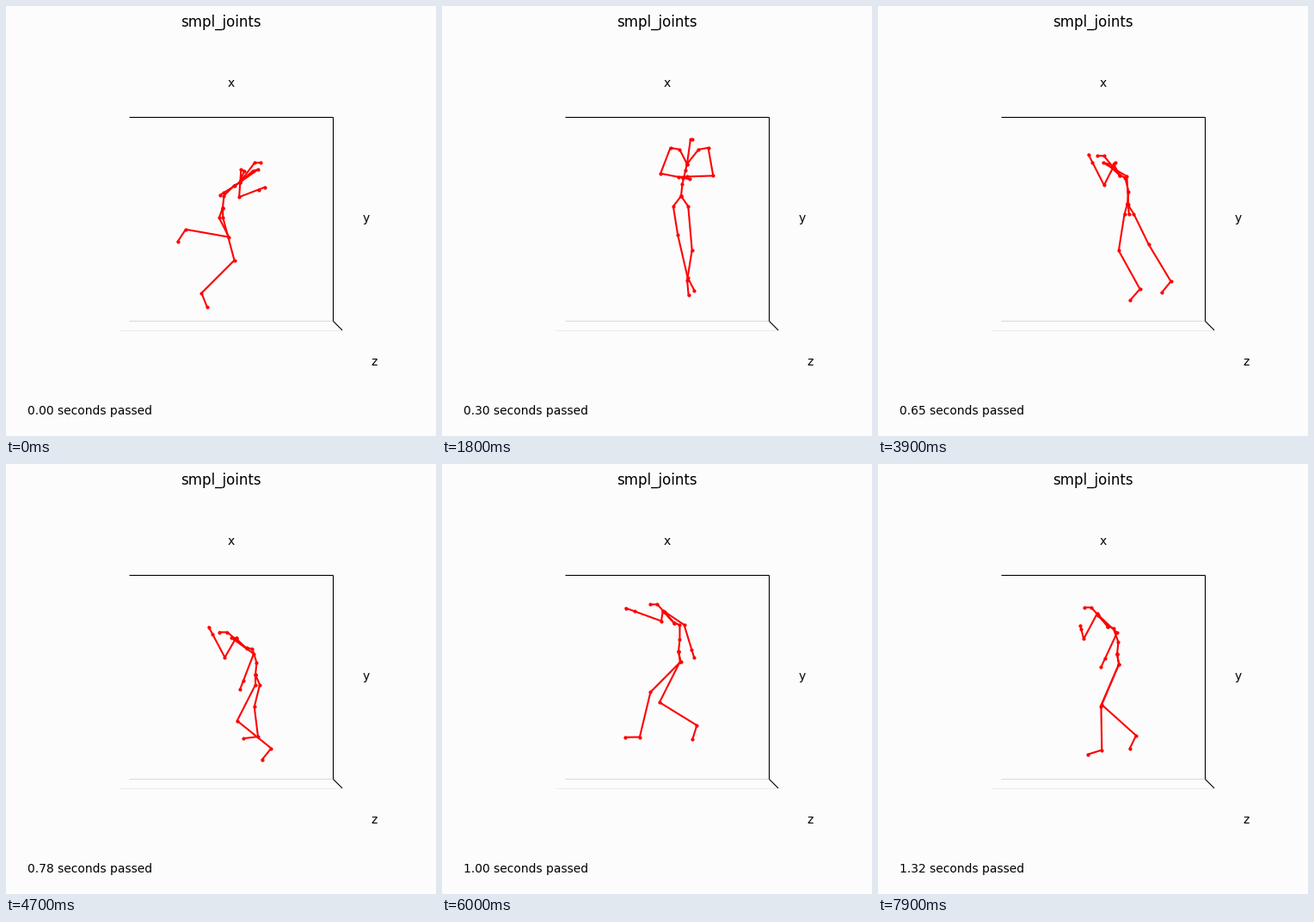
A matplotlib script for the animation above (8 s loop, 500 px wide and 500 px high).

```python
import numpy as np
import matplotlib.pyplot as plt
from matplotlib.animation import FuncAnimation

FRAMES, FPS = 80, 60
BG = "#fcfcfc"
T = np.arange(FRAMES)

# Key poses of the turn and run: pelvis in pixels, everything else in degrees.
# Limb angles start at straight down and grow to the right; torso ones at up.
KEYS = np.array([0, 18, 26, 39, 47, 60, 79])
POSE = {
    "x": (252, 278, 287, 290, 290, 275, 278),
    "y": (235, 223, 240, 230, 245, 218, 221),
    "bend": (45, 13, 0, -14, -17, 0, -20),
    "lean": (37, 8, -4, -39, -50, -42, -41),
    "upper_a": (-4, -21, 12, 60, 54, -9, 47),
    "fore_a": (111, 79, 25, 3, -21, -110, -25),
    "upper_b": (-55, 10, -25, -27, -30, 56, -28),
    "fore_b": (-58, -88, -124, -153, -152, 17, -166),
    "thigh_a": (27, 9, 20, -9, -27, -29, -23),
    "shin_a": (-100, 13, 16, 29, 51, 58, 1),
    "thigh_b": (15, 5, 5, 26, -14, -46, -26),
    "shin_b": (-45, -9, -15, 31, 7, -14, 47),
}


def spline(vals):
    """Sample a smooth curve through the key values at every frame."""
    v = np.array(vals, float)
    slope = np.gradient(v, KEYS)
    i = np.clip(np.searchsorted(KEYS, T, side="right") - 1, 0, len(KEYS) - 2)
    h = KEYS[i + 1] - KEYS[i]
    u = (T - KEYS[i]) / h
    return ((1 + 2 * u) * (1 - u) ** 2 * v[i] + u * (1 - u) ** 2 * h * slope[i]
            + u * u * (3 - 2 * u) * v[i + 1] - u * u * (1 - u) * h * slope[i + 1])


def bump(center, width):
    return np.exp(-((T - center) / width) ** 2)


def vec(x, y):
    return np.stack(np.broadcast_arrays(x, y, T)[:2], axis=-1)


def down(deg, length):
    a = np.radians(deg)
    return vec(length * np.sin(a), length * np.cos(a))


def up(deg, length):
    return down(180 - deg, length)


p = {name: spline(vals) for name, vals in POSE.items()}

# The leap at the start and the push-off of each leg.
p["y"] -= 26 * bump(10, 5)
push_a, push_b = bump(56.5, 2), bump(70, 5)
p["thigh_a"] += 47 * push_a
p["shin_a"] += 8 * push_a
p["thigh_b"] += 66 * push_b
p["shin_b"] += 28 * push_b

# Visible bone lengths: limbs shorten while they point along the view.
length = {
    "upper_a": 32 - 20 * bump(60, 6),
    "fore_a": 24 + 9 * np.clip(T / 39, 0, 1) ** 2,
    "upper_b": 33 - 7 * bump(50, 13),
    "fore_b": 30 - 15 * bump(0, 8) - 18 * bump(79, 3),
    "thigh_a": 25 + 28 * np.clip(T / 60, 0, 1),
    "shin_a": 51,
    "thigh_b": 51 - 25 * bump(46, 8),
    "shin_b": 54 - 22 * bump(22, 9) - 19 * bump(47, 6),
}


def bone(name):
    return down(p[name], length[name])


def chain(*steps):
    """Add up bone vectors; gives frames x joints x 2."""
    return np.cumsum(np.stack(steps, axis=1), axis=1)


lean = p["lean"]
pelvis = vec(p["x"], p["y"])
spine = chain(pelvis, up(6, 14), up(p["bend"], 17), up(1.7 * lean, 7),
              up(lean, 29), vec(12 * np.sin(np.radians(lean)), 0))
chest = spine[:, 3]


def leg(side, sign):
    hip = down(-0.25 * lean, 12) + vec(sign * 9.5 * bump(24, 20), 0)
    foot = down(p["shin_" + side] + 1.8 * lean, 17)
    return chain(pelvis, hip, bone("thigh_" + side), bone("shin_" + side), foot)


def arm(side, sign):
    half = vec(sign * 11 * bump(18, 20), 0)
    collar = up(lean, 17) + half
    shoulder = up(lean, 2) + half
    fore = bone("fore_" + side)
    return chain(chest, collar, shoulder, bone("upper_" + side), fore, fore / 3)


chains = [leg("a", -1), leg("b", 1), spine, arm("a", -1), arm("b", 1)]

fig = plt.figure(figsize=(5, 5), dpi=100, facecolor=BG)
ax = fig.add_axes([0, 0, 1, 1])
ax.set_xlim(0, 500)
ax.set_ylim(500, 0)
ax.axis("off")

fig.suptitle("smpl_joints", fontsize=12)
for name, x, y in (("x", 261.5, 94.5), ("y", 418.5, 251.5), ("z", 428.5, 418.5)):
    ax.text(x, y, name, fontsize=10, ha="center", va="baseline")
clock = ax.text(25, 475.5, "", fontsize=10, va="baseline")

for xs, ys, color in (
    ((132, 391), (377, 377), "#ebebeb"),
    ((143, 380), (366, 366), "#dadada"),
    ((143, 380), (129, 129), "black"),
    ((380, 380), (129, 366), "black"),
    ((380.5, 391), (366.5, 377), "black"),
):
    ax.plot(xs, ys, color=color, lw=0.8, solid_capstyle="butt")

lines = [ax.plot([], [], color="red", lw=1.5, marker=".", ms=4)[0] for _ in chains]


def update(f):
    for line, pts in zip(lines, chains):
        line.set_data(pts[f, :, 0], pts[f, :, 1])
    clock.set_text(f"{f / FPS:.2f} seconds passed")
    return [*lines, clock]


anim = FuncAnimation(fig, update, frames=FRAMES, interval=100, repeat=True)
plt.show()
```
